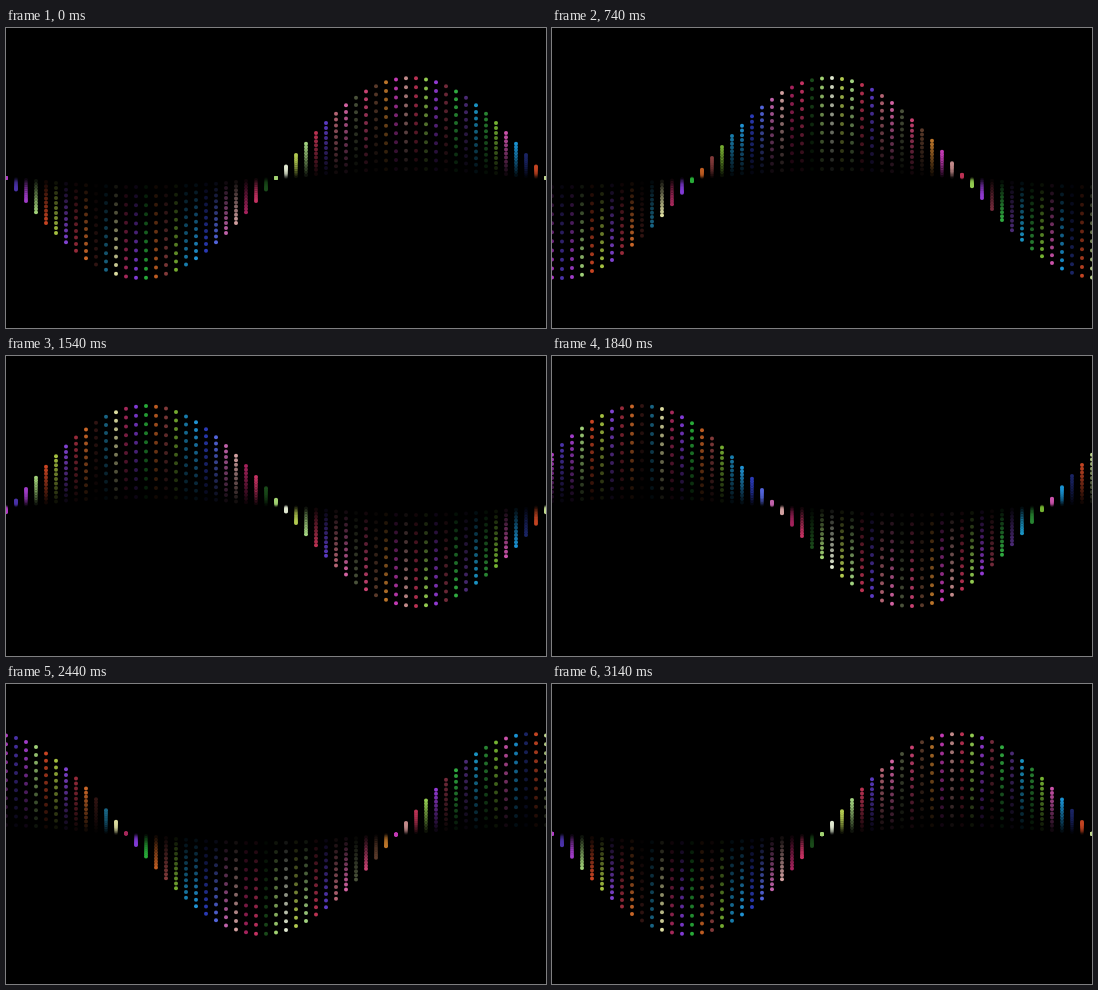
An HTML page with a canvas for the animation above (3160 ms loop, 540 by 300 pixels).

```html
<!DOCTYPE html>
<html lang="en">
<head>
<meta charset="utf-8">
<title>Dotted wave</title>
<style>
html, body { margin: 0; width: 100%; height: 100%; overflow: hidden; background: #000; }
canvas { display: block; }
</style>
</head>
<body>
<canvas id="stage" width="540" height="300"></canvas>
<script>
const ctx = document.getElementById('stage').getContext('2d');

const WIDTH = 540, HEIGHT = 300, GAP = 10;
const AMPLITUDE = 100, DOTS = 11, RADIUS = 2;
const LOOP = 3160, STEP = 20, PHASE_STEP = 0.04;

// One colour per column, from left to right
const colors = [
  '#b43cc8', '#4a32a8', '#a03cc8', '#a0d078', '#c84422', '#a4c040', '#8042d0', '#962a3a', '#c86628', '#301412',
  '#186484', '#dcdca0', '#a4285a', '#803ad4', '#28aa38', '#bc5c22', '#823a3a', '#74aa30', '#187cac', '#2092d2',
  '#2a3ab6', '#5264da', '#c062aa', '#d2a0a0', '#a4225c', '#c43262', '#1a4a1a', '#a2d272', '#e0e8d0', '#b2ca50',
  '#a2d280', '#ba3252', '#5a3ac2', '#b46474', '#d262a2', '#4a523a', '#c84272', '#5a3a2a', '#ba742a', '#c23ab4',
  '#c28a8a', '#ba3254', '#92ca50', '#923ad2', '#722a3a', '#30aa40', '#4a2a74', '#1a92c2', '#288432', '#74b232',
  '#ca52aa', '#1a92d2', '#1a2464', '#c24422', '#c2da90'
];

function drawColumn(color, x, reach) {
  ctx.fillStyle = color;
  for (let k = 1; k <= DOTS; k++) {
    const part = k / DOTS;
    ctx.globalAlpha = part;
    ctx.beginPath();
    ctx.arc(x, HEIGHT / 2 + reach * part, RADIUS, 0, Math.PI * 2);
    ctx.fill();
  }
}

function draw(ms) {
  const phase = Math.floor((ms % LOOP) / STEP) * PHASE_STEP;
  ctx.globalAlpha = 1;
  ctx.fillStyle = '#000';
  ctx.fillRect(0, 0, WIDTH, HEIGHT);
  colors.forEach((color, i) => {
    const x = i * GAP;
    drawColumn(color, x, AMPLITUDE * Math.sin(x / WIDTH * Math.PI * 2 + phase));
  });
}

const start = performance.now();
function tick() {
  draw(performance.now() - start);
  requestAnimationFrame(tick);
}
tick();
</script>
</body>
</html>
```
